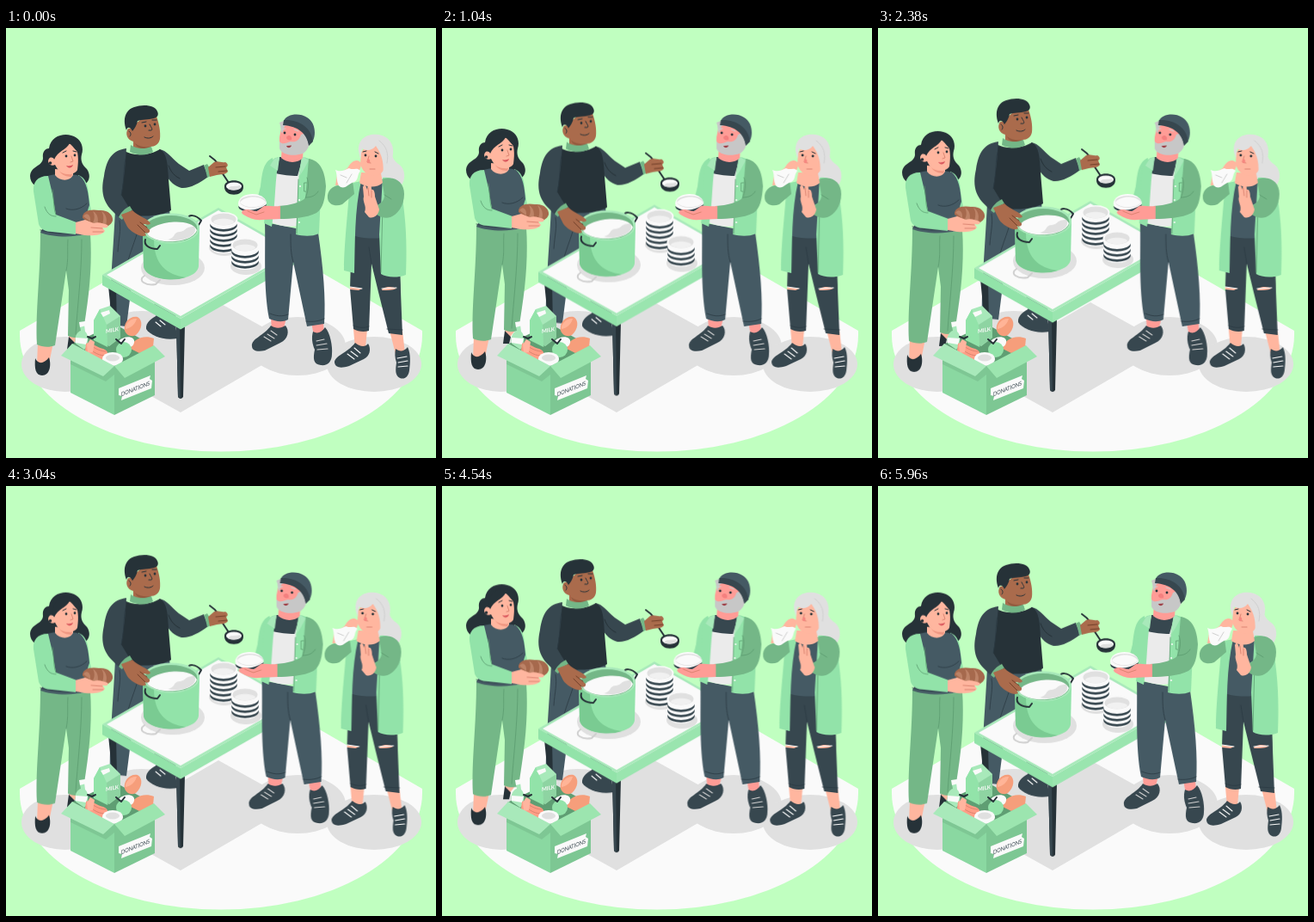
Write an HTML page that moves like this. It is 500 px wide and 500 px high and loops after 6 s.

```html
<!DOCTYPE html>
<html lang="en">
<head>
<meta charset="utf-8">
<title>Soup kitchen</title>
<style>
html, body { margin: 0; width: 100%; height: 100%; overflow: hidden; background: #c0ffc0; }
svg { display: block; width: 100vw; height: 100vh; }
.helper { animation: rise 3s linear infinite; }
.serving { animation: rise 6s linear infinite; }
.guests { animation: shiver 6s linear infinite; }
@keyframes rise { 50% { transform: translateY(-10px); } }
@keyframes shiver {
  10%, 90% { transform: translateX(-1px); }
  20%, 80% { transform: translateX(2px); }
  30%, 50%, 70% { transform: translateX(-4px); }
  40%, 60% { transform: translateX(4px); }
}
.shade { fill: #e0e0e0; }
.white { fill: #fafafa; }
.cloth { fill: #ebebeb; }
.grey { fill: #c7c7c7; }
.green { fill: #92e3a9; }
.pale { fill: #a8e9ba; }
.mid { fill: #7dc793; }
.moss { fill: #74b787; }
.ink { fill: #263238; }
.navy { fill: #37474f; }
.slate { fill: #455a64; }
.brown { fill: #aa6b4c; }
.skin { fill: #ffb69f; }
.pink { fill: #ff9c96; }
.line { fill: none; stroke: #263238; stroke-width: 1; stroke-linecap: round; stroke-linejoin: round; }
.thick { stroke-width: 2; }
.seam { stroke: #5c9c70; stroke-width: .8; }
.fold { stroke: #2c3c45; stroke-width: .8; }
.lace { stroke: #fafafa; stroke-width: 1.1; }
.crease { stroke: #d8806e; stroke-width: .9; }
.dim { stroke: #713f29; }
.faint { stroke: #d0d0d0; }
text { font-family: "Lato", "Open Sans", sans-serif; }
</style>
</head>
<body>
<svg viewBox="0 0 500 500">
  <path class="white" d="M16 352 250 217 484 352V357A234 135.500 0 0 1 16 357Z"/>
  <g class="shade">
    <ellipse cx="69" cy="391" rx="51" ry="32"/>
    <ellipse cx="158" cy="357" rx="50" ry="28"/>
    <path d="M113 397 203 447 337 369 247 319Z"/>
    <ellipse cx="339" cy="370" rx="56" ry="34"/>
    <ellipse cx="428" cy="391" rx="55" ry="32"/>
  </g>

  <g class="serving">
    <!-- server -->
    <path class="slate" d="M127 212 190 208 198 348 176 345 164 262 146 300 140 347 121 345C120 310 124 270 127 212Z"/>
    <path class="line fold" d="M157 218C155 236 148 250 142 270M132 224C134 236 131 244 130 260"/>
    <path class="navy" d="M163 350C162 342 170 337 178 333L197 343 199 361C184 364 168 358 163 350Z"/>
    <path class="line lace" d="M174 342 180 347M179 340 185 345"/>
    <path class="navy" d="M178 141C187 142 192 151 201 158L213 166 230 159 235 173C224 181 213 187 204 186 196 184 190 178 186 171Z"/>
    <path class="ink" d="M136 142C148 150 168 148 179 141 187 145 188 158 189 176L192 212C178 220 150 221 134 213L133 168Z"/>
    <path class="line" d="M189 160C192 168 196 172 202 175"/>
    <path class="navy" d="M140 140C124 142 117 152 114 172 110 190 113 200 121 210L132 221 143 209 134 194 138 166Z"/>
    <path class="line fold" d="M139 152C136 164 138 178 134 194"/>
    <path class="moss" d="M131 220C134 214 138 210 144 207L147 212C142 214 138 217 135 223ZM230 160 234 158C237 162 238 167 238 172L234 174C233 169 232 164 230 160Z"/>
    <path class="brown" d="M147 116C155 104 170 100 175 103 178 111 180 121 179 129 178 135 173 138 168 138V143H148V132C141 130 138 123 142 117Z"/>
    <path fill="#93593e" d="M150 134C155 138 161 139 168 138V141C160 142 152 140 150 134Z"/>
    <path class="moss" d="M145 136C152 141 161 141 169 138L171 144C163 149 152 148 144 144Z"/>
    <path class="ink" d="M140 119C135 106 139 95 149 92 160 88 174 90 176 97 178 101 176 104 172 105 165 107 158 106 153 108 152 113 150 116 147 120 145 115 141 114 140 119Z"/>
    <path class="line" d="M158 110 163 109M170 107 175 107M167 112C169 116 171 118 169 119L166 119M161 127C165 129 169 128 171 126M143 120C145 121 146 124 144 126"/>
    <g class="ink"><circle cx="162" cy="114" r="1.400"/><circle cx="173" cy="112" r="1.400"/></g>
    <path class="line thick" d="M237 149C246 155 248 160 251 168L259 180"/>
    <path class="brown" d="M235 162 242 156C247 154 250 157 255 156 259 158 258 161 256 162L258 167C255 171 249 170 245 171L237 173Z"/>
    <path class="line dim" d="M244 162 255 161M247 167 257 166"/>
    <path class="ink" d="M254 184C253 197 277 197 276 184 276 175 254 175 254 184Z"/>
    <ellipse class="white" cx="265" cy="184" rx="9" ry="4.500"/>
    <path class="shade" d="M258 187C261 182 266 185 272 183L273 186C269 189 261 189 258 187Z"/>

    <!-- table -->
    <path class="ink" d="M119 300H128L129 350H124ZM198 345H208L206 429C204 432 201 431 200 429Z"/>
    <path class="navy" d="M198 345H202L203 430 200 429Z"/>
    <path class="green" d="M112 287 203 338V350.500L112 299Z"/>
    <path fill="#9ae5af" d="M203 338 338 261V273.500L203 350.500Z"/>
    <path class="pale" d="M112 287 247 209 338 261 203 338Z"/>
    <path class="white" d="M117 287 247 212 333 261 203 335Z"/>
    <ellipse class="shade" cx="194" cy="279" rx="37" ry="20"/>
    <path class="line thick faint" d="M161 288C152 294 163 300 174 298L179 293"/>

    <!-- pot -->
    <path class="line thick" d="M211 222C212 217 220 216 227 224L224 229"/>
    <path class="green" d="M159 233C159 211 225 211 225 233L224 277C222 297 162 297 160 277Z"/>
    <path fill="#7acb92" d="M159 233 160 277C162 291 192 296 209 290 187 287 172 275 172 246Z"/>
    <ellipse class="pale" cx="192" cy="233" rx="33" ry="17.500"/>
    <ellipse class="moss" cx="192" cy="233.500" rx="30.500" ry="15.500"/>
    <path class="white" d="M164 239C168 225 215 219 222 235 216 252 172 252 164 239Z"/>
    <path class="shade" d="M188 246C199 243 193 238 202 237 210 236 207 231 219 231 225 241 205 250 188 246Z"/>
    <path class="line thick" d="M162 246C160 252 166 257 176 257L179 253"/>
    <path class="brown" d="M134 217 147 212C154 219 164 221 168 227 167 230 162 228 159 228L167 235C168 238 164 240 161 237L163 241C158 245 145 237 141 231Z"/>
    <path class="line dim" d="M153 229 162 238M156 226 164 232"/>

    <!-- bowls -->
    <defs>
      <g id="bowl">
        <path class="white" d="M-16 0C-15 13 -8 14 0 14S15 13 16 0Z"/>
        <path class="navy" d="M-16 3.500C-12 12 12 12 16 3.500L15.500 7C11 14.500 -11 14.500 -15.500 7Z"/>
      </g>
      <g id="rim">
        <ellipse class="white" rx="16.500" ry="8.500"/>
        <ellipse class="shade" rx="14.500" ry="7"/>
        <path fill="#f1f1f1" d="M-12 3C-10 -2 10 -2 12 3 8 8 -8 8 -12 3Z"/>
      </g>
    </defs>
    <ellipse class="shade" cx="254" cy="255" rx="18" ry="10"/>
    <ellipse class="shade" cx="279" cy="277" rx="18" ry="10"/>
    <use href="#bowl" x="253" y="248"/><use href="#bowl" x="253" y="242"/><use href="#bowl" x="253" y="236"/><use href="#bowl" x="253" y="230"/><use href="#bowl" x="253" y="224"/>
    <use href="#rim" x="253" y="222.500"/>
    <use href="#bowl" x="278" y="267"/><use href="#bowl" x="278" y="261"/><use href="#bowl" x="278" y="255"/>
    <use href="#rim" x="278" y="252.500"/>
  </g>

  <!-- helper with bread -->
  <g class="helper">
    <path class="skin" d="M37 366H55L50 390 36 391ZM73 355H88L80 365 74 367Z"/>
    <path class="ink" d="M34 384C37 391 44 391 50 383 53 392 51 404 42 404 34 404 33 395 34 384ZM73 359 80 366 78 374H71Z"/>
    <path class="moss" d="M40 236C60 243 80 243 98 239 100 268 98 300 93 332L89 359C83 361 76 360 72 358L73 305 70 282 57 369C50 372 42 371 36 368 34 330 40 290 40 236Z"/>
    <path class="line seam" d="M70 282C73 268 71 258 72 246M88 246C88 285 83 325 81 356"/>
    <path class="ink" d="M50 140C52 126 66 122 76 125 87 128 91 138 88 147 86 156 90 160 94 164 99 171 97 179 91 182L56 185C42 190 28 184 28 172 29 160 43 161 43 151 42 144 46 140 50 140Z"/>
    <path class="green" d="M84 171C92 173 96 184 96 194L101 225 90 230 84 205Z"/>
    <path class="slate" d="M46 173C55 169 76 169 86 172 94 179 96 192 97 206 93 216 92 230 92 240 75 244 53 243 40 238L49 220Z"/>
    <path class="line fold" d="M70 210C77 213 87 211 94 204M40 235C57 240 75 240 92 237"/>
    <path class="skin" d="M57 164 78 166V171C74 179 62 178 57 171Z"/>
    <path fill="#ef9681" d="M61 164C65 169 71 171 77 170L76 173C69 173 63 170 61 164Z"/>
    <path class="skin" d="M56 142C63 134 74 132 81 138 85 147 84 158 83 165 80 171 70 171 64 168 61 166 59 163 57 159 52 162 47 156 50 152 52 149 55 151 56 152Z"/>
    <path class="ink" d="M56 153C52 143 58 129 70 129 79 128 87 133 86 146 83 145 79 139 74 134 70 142 60 143 56 153Z"/>
    <circle class="ink" cx="51.500" cy="157" r="1.800"/>
    <g class="ink"><circle cx="70" cy="149" r="1.400"/><circle cx="80" cy="148" r="1.400"/></g>
    <path class="line" d="M66 145 70 143M78 143 82 144"/>
    <path class="line crease" d="M76 149 78 155 75 156"/>
    <path fill="#d9545b" d="M70 160C73 161 76 160 78 159 77 163 73 164 70 160Z"/>
    <path class="green" d="M49 172C36 172 31 180 32 190L38 228C40 234 46 237 54 237L81 240 82 226 58 217 54 193Z"/>
    <path class="line seam" d="M54 188C56 200 55 210 58 217M45 208C48 217 53 219 58 219"/>
    <path fill="#a6694d" d="M89 221C88 213 98 210 108 212 118 211 125 217 124 224 122 231 112 234 103 231Z"/>
    <path fill="#bd8367" d="M90 219C94 213 99 218 98 225ZM101 213C107 216 108 223 106 230L100 228C104 222 103 217 101 213ZM111 213C117 217 118 223 116 230L111 231C114 223 114 218 111 213Z"/>
    <path class="skin" d="M81 226 92 223 102 227C107 225 113 227 118 229 120 232 116 233 112 232L115 236C112 241 100 242 92 241L81 239Z"/>
    <path class="line crease" d="M99 232 112 233M101 237 113 237"/>
  </g>

  <!-- donation box -->
  <path fill="#5f9e73" d="M76 368 126 344 172 370 126 394Z"/>
  <path class="pale" d="M86 347 91 345 92 353C98 358 95 371 91 374L81 367C79 359 83 353 87 352Z"/>
  <path class="white" d="M85 342 92 341 93 346 86 348ZM81 360 95 361 93 368 81 366Z"/>
  <path class="pale" d="M102 340 109 327 121 323 133 335 133 360 120 370 102 361Z"/>
  <path class="green" d="M102 340 117 345 118 371 102 363ZM109 327 117 345 102 340Z"/>
  <path class="mid" d="M117 345 133 335 133 360 118 371Z" opacity=".6"/>
  <path class="white" d="M110 331 120 328 121 332 113 336Z"/>
  <text transform="matrix(.95 -.18 0 1 116 355)" font-size="6.500" font-weight="700" fill="#fafafa">MILK</text>
  <path fill="#f69e7b" d="M138 352C136 343 144 334 153 336 160 340 158 351 151 357 145 360 140 357 138 352Z"/>
  <path fill="#ffb497" d="M139 350C138 343 146 337 152 338 150 345 145 349 139 350Z"/>
  <path fill="#f69e7b" d="M145 373C146 362 160 356 172 361L171 371 155 378Z"/>
  <path class="white" d="M131 364C139 356 151 359 149 366 147 374 138 373 131 364Z"/>
  <circle class="green" cx="137" cy="374" r="9"/>
  <path class="line thick" d="M128 362 134 367 138 362M95 359 100 361 104 359"/>
  <path fill="#ff9e86" d="M93 367C99 365 104 371 113 373 119 375 120 380 116 386 108 388 96 382 92 375Z"/>
  <path class="line crease" d="M95 370C102 379 110 381 116 381M97 368C105 374 111 376 116 376"/>
  <path fill="#ffb59f" d="M94 368 98 362 103 365 101 377 95 378Z"/>
  <ellipse class="white" cx="124" cy="385" rx="12" ry="8"/>
  <ellipse class="shade" cx="124" cy="383.500" rx="8" ry="4"/>
  <path fill="#8ad8a1" d="M75 372 126 394V450L75 424Z"/>
  <path class="mid" d="M126 394 173 371V427L126 450Z"/>
  <path class="moss" d="M75 386 114 404 126 393 126 403 116 411 75 391Z" opacity=".5"/>
  <path class="pale" d="M77 367 64 381 113 405 126 393Z"/>
  <path fill="#9ce5af" d="M126 393 172 369 185 382 138 407Z"/>
  <path class="white" d="M131 419 168 404 167 408 170 410 169 419 134 433 135 428 131 427Z"/>
  <text transform="matrix(.8 -.32 0 1 134 428.500)" font-size="7" fill="#37474f">DONATIONS</text>

  <g class="guests">
    <!-- man -->
    <path class="pink" d="M308 337H326L322 353 309 352ZM355 342H369L370 357 358 358Z"/>
    <path class="navy" d="M286 370C285 361 300 358 308 346 314 350 320 349 325 346 330 352 328 362 319 366L301 375C292 377 286 375 286 370ZM357 353C362 356 367 354 371 348 377 354 380 371 379 379 379 388 374 393 366 392 357 391 357 384 359 374 356 367 355 360 357 353Z"/>
    <path class="line lace faint" d="M300 359 308 364M304 356 312 361M308 352 315 357M361 364 370 362M361 369 373 367M362 374 374 373"/>
    <path class="slate" d="M301 226 363 238C369 280 372 315 370 344L350 347 334 272 328 339C321 343 313 341 306 338 299 302 302 258 301 226Z"/>
    <path class="line fold" d="M334 272C331 262 331 252 331 240M307 332C314 335 321 336 328 333M349 341C357 342 364 341 370 338"/>
    <path class="green" d="M310 151C299 156 298 168 296 184L290 208 304 212 314 192Z"/>
    <path class="cloth" d="M314 158 341 156 340 230C330 232 316 230 309 226Z"/>
    <path class="navy" d="M318 150 345 151 339 172C331 172 321 171 314 169Z"/>
    <path class="green" d="M313 151 318 150C312 175 314 202 309 231L300 227C303 205 301 175 305 157Z"/>
    <path class="green" d="M344 150C355 151 363 157 367 168L364 239C355 243 345 242 337 240L340 178Z"/>
    <path class="pale" d="M344 149 352 154 346 165 340 174ZM312 152 318 150 316 166 307 160Z"/>
    <path class="line seam" d="M340 176 338 239M347 180H358V191L347 190Z"/>
    <g fill="#fafafa"><circle cx="342" cy="184" r="1"/><circle cx="341" cy="200" r="1"/><circle cx="341" cy="226" r="1"/></g>
    <path class="moss" d="M352 152C365 154 371 166 372 184 371 198 369 210 361 215 349 221 332 222 318 222L317 207C331 206 342 203 348 198L350 176Z"/>
    <path class="line seam" d="M350 174C353 182 351 191 348 198M349 197C355 197 360 195 363 190"/>
    <path class="pink" d="M321 137 346 138 345 151C339 158 326 157 320 151Z"/>
    <path class="pink" d="M321 112C331 105 344 110 349 121 351 135 346 146 333 147 322 147 317 139 318 127Z"/>
    <path class="grey" d="M318 132C321 136 326 134 331 132 337 133 341 131 343 124L351 121C356 132 352 142 345 146 333 150 320 147 318 140ZM318 110 325 107 333 110 324 114 321 123C319 119 320 115 318 110Z"/>
    <path class="slate" d="M323 108C326 100 341 98 350 104 359 109 361 122 357 131L352 135C349 120 340 111 323 108Z"/>
    <path class="navy" d="M323 107C340 106 355 115 357 132L352 137C350 123 340 114 322 113Z"/>
    <path fill="#f4807f" d="M326 127C329 123 333 126 332 130 329 131 326 130 326 127Z"/>
    <path fill="#9f4148" d="M326 137 332 136.500C331 140 327 140 326 137Z"/>
    <g class="ink"><circle cx="324" cy="122" r="1.400"/><circle cx="336" cy="124" r="1.400"/></g>
    <path class="line faint" d="M321 118 325 117M335 118 340 120"/>
    <path class="white" d="M270 204C271 190 300 189 303 203 301 214 293 217 286 217 276 217 271 211 270 204Z"/>
    <ellipse class="shade" cx="287" cy="202" rx="15" ry="7"/>
    <path class="white" d="M272 203C277 195 297 194 302 203 296 210 278 210 272 203Z"/>
    <path class="navy" d="M270 207C278 214 291 213 303 205L302 208C290 216 278 216 271 210Z"/>
    <path class="pink" d="M276 212C281 209 286 213 292 213L300 207C305 206 310 208 319 207V222L297 223C290 224 283 221 276 217 273 215 274 213 276 212Z"/>
    <path class="line crease" d="M281 213 291 217 300 214"/>

    <!-- woman with tissue -->
    <path class="shade" d="M437 132C449 137 446 151 456 158 466 164 465 180 457 185L429 184 430 150Z"/>
    <path class="skin" d="M404 350H420L418 372 406 373ZM446 352H461L464 379 453 379Z"/>
    <path class="navy" d="M382 389C382 381 397 378 406 366 412 371 418 371 421 367 425 373 423 382 416 385L399 393C389 396 383 395 382 389ZM453 373C458 377 463 376 467 371 471 379 470 390 469 398 468 406 463 409 458 407 452 404 453 397 454 389 452 383 452 378 453 373Z"/>
    <path class="line lace" d="M397 379 405 385M401 376 409 382M405 372 412 378M455 384 466 382M456 389 467 387M456 394 467 393"/>
    <path class="navy" d="M402 238 448 242C457 265 459 282 459 307L461 357 445 355 433 307 425 274 422 352C416 354 409 353 404 350L400 303Z"/>
    <path class="skin" d="M400 301 414 303 410 305 400 304ZM438 303C444 300 450 301 454 303 449 305 443 305 437 305Z"/>
    <path class="line lace" d="M400 301 414 303M437 303 454 302"/>
    <path class="line fold" d="M425 274 422 255M404 346C411 349 417 349 422 347M443 350 461 351"/>
    <path class="slate" d="M406 180 438 178 437 244C426 245 411 245 402 240Z"/>
    <path class="green" d="M404 180 413 178C405 212 406 250 405 285L393 282C393 252 398 210 399 190ZM438 174C454 172 462 184 462 205 466 235 466 263 465 287 455 291 442 290 436 286L434 240Z"/>
    <path class="line seam" d="M438 205 436 284"/>
    <path class="moss" d="M437 176C452 171 463 179 463 193 463 207 455 217 447 220 441 222 436 220 431 217L431 206C436 204 440 200 440 195Z"/>
    <path class="line seam" d="M440 194 448 199"/>
    <path class="skin" d="M413 168 436 169 438 180C431 187 417 185 411 180Z"/>
    <path class="skin" d="M413 145C419 133 435 133 440 147 443 159 440 169 431 172 420 173 414 166 412 158Z"/>
    <path class="shade" d="M410 143C409 128 421 122 433 124 447 126 453 138 449 152 447 164 441 170 438 174 440 159 438 148 430 137 426 143 418 143 414 140L412 152Z"/>
    <path class="line faint" d="M434 131C443 138 445 146 443 157"/>
    <g class="ink"><circle cx="418" cy="148" r="1.400"/><circle cx="430" cy="149" r="1.400"/></g>
    <path class="line" d="M415 144 419 143M429 144 433 146"/>
    <path class="line crease" d="M422 149 420 156 424 157M423 164 429 164"/>
    <path fill="#f58880" d="M420 153C422 151 424 154 423 157 420 158 419 156 420 153Z"/>
    <path class="moss" d="M403 177C394 181 389 185 386 183 380 184 373 189 374 198 375 206 384 208 391 205L405 193Z"/>
    <path class="skin" d="M383 183 394 182 404 175 411 165C414 160 414 155 408 154 403 154 400 158 397 163L385 171Z"/>
    <path class="white" d="M383 165C389 168 394 165 399 163 403 166 408 161 412 166 408 171 410 177 405 179 398 181 396 187 389 185 383 181 386 171 383 165Z"/>
    <path class="line faint" d="M389 171 396 174M402 170 396 180"/>
    <path class="skin" d="M417 214C420 207 414 202 416 196L415 185C417 180 419 184 420 188L421 181C424 179 425 184 425 188 428 187 429 192 429 196L434 211C433 218 427 222 422 220Z"/>
    <path class="line crease" d="M421 186 422 195M425 189 425 197"/>
  </g>
</svg>
</body>
</html>
```
